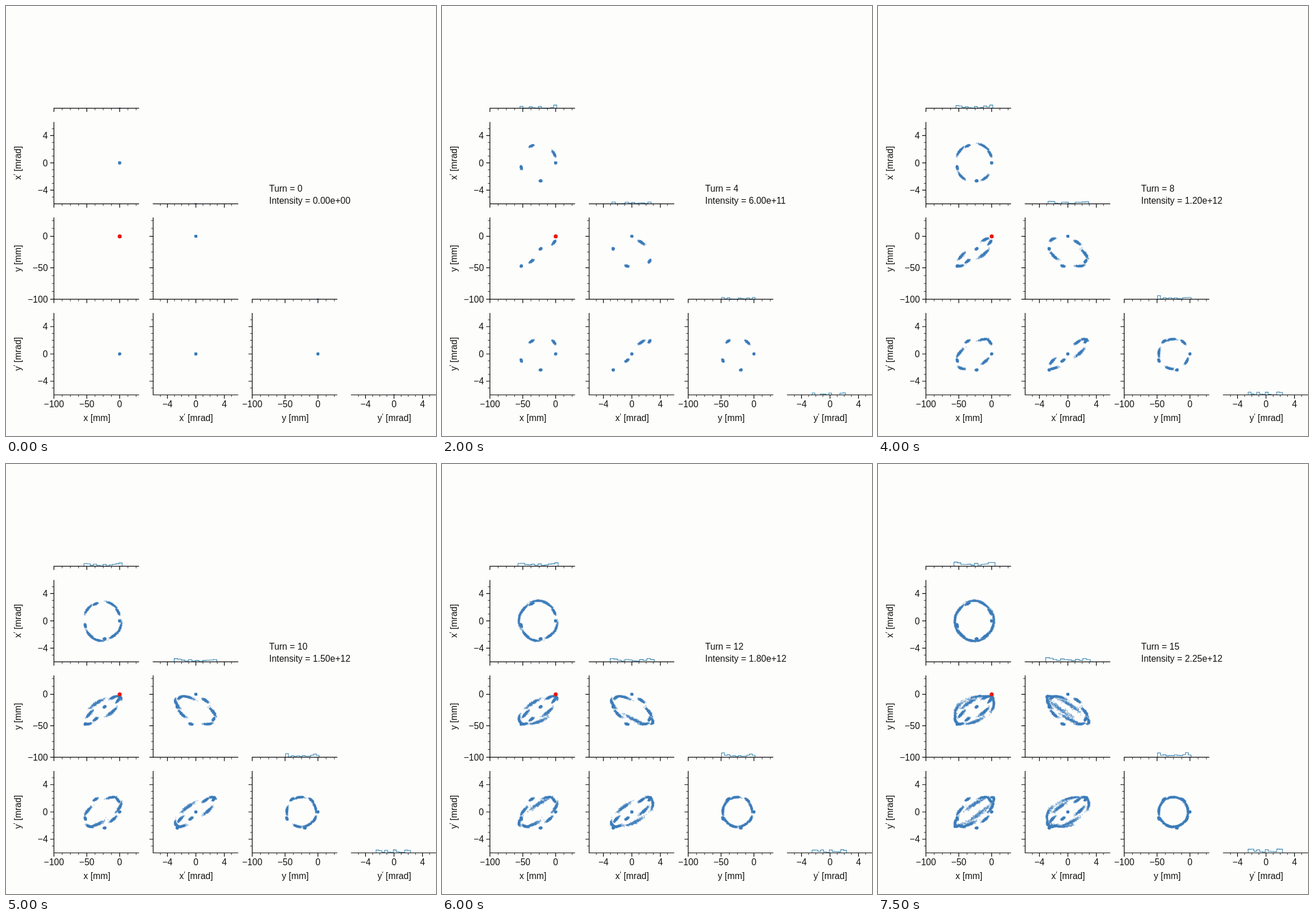
These frames come from a looping animation (748 px wide and 748 px high, 8000 ms). An HTML page with a canvas:

```html
<!DOCTYPE html>
<html lang="en">
<head>
<meta charset="utf-8">
<title>Phase space painting</title>
<style>
  html, body { margin: 0; width: 100%; height: 100%; overflow: hidden; background: #fdfdfc; }
  canvas, svg { position: absolute; left: 0; top: 0; width: 748px; height: 748px; }
  text { font: 15.6px "Liberation Sans", Arial, sans-serif; fill: #111; }
  .prime { font-size: 12px; }
  .axes { stroke: #000; stroke-width: 1.2; fill: none; }
  .minor { stroke: #000; stroke-width: .8; fill: none; }
</style>
</head>
<body>
<canvas id="beam" width="748" height="748"></canvas>
<svg id="plot" viewBox="0 0 748 748">
  <path class="axes" id="axes"/>
  <path class="minor" id="minor"/>
  <circle cx="197.8" cy="400.8" r="3.5" fill="#e8170f"/>
  <text id="turn" x="457.8" y="323"></text>
  <text id="intensity" x="457.8" y="344.2"></text>
</svg>
<script>
const TURN_MS = 500, TURNS = 16, PER_BUNCH = 300, BINS = 12;
const BUNCH_HEIGHT = 3.2;
const WIDTH = 148.6, HEIGHT = 142.5;
const LEFT = [83.4, 256, 428.3, 600.7];
const BOTTOM = [177.8, 344.2, 510.2, 676.5];

const mm = { min: -100, max: 30, major: [-100, -50, 0], step: 12.5, noise: 1.4 };
const mrad = { min: -6, max: 6, major: [-4, 0, 4], step: 1, noise: 0.13 };
const DIMS = [
  { name: "x", unit: "mm", ...mm },
  { name: "x′", unit: "mrad", ...mrad },
  { name: "y", unit: "mm", ...mm },
  { name: "y′", unit: "mrad", ...mrad }
];

const $ = id => document.getElementById(id);
const ctx = $("beam").getContext("2d");
const frac = (dim, v) => (v - dim.min) / (dim.max - dim.min);
const px = (d, v, col = d) => LEFT[col] + frac(DIMS[d], v) * WIDTH;
const py = (d, v) => BOTTOM[d] - frac(DIMS[d], v) * HEIGHT;

let seed = 7;
function random() {
  seed = (Math.imul(seed, 1664525) + 1013904223) >>> 0;
  return seed / 4294967296;
}
// Bounded bell curve within ±1.5
const bell = () => random() + random() + random() - 1.5;

// Particles of a bunch that has circulated for k turns
function makeBunch(k) {
  const rx = Math.min(26.3 + 0.3 * k, 29.8);
  const ry = Math.max(25.1 - 0.4 * k, 22.3);
  return Array.from({ length: PER_BUNCH }, () => {
    const drift = bell() * 0.04;
    const ax = k * (drift + bell() * 0.008 - 82.6 * Math.PI / 180);
    const ay = k * (drift + bell() * 0.008 - 77.8 * Math.PI / 180);
    const center = [
      -26.3 + rx * Math.cos(ax), 0.0995 * rx * Math.sin(ax),
      -25.1 + ry * Math.cos(ay), 0.097 * ry * Math.sin(ay)
    ];
    return center.map((v, d) => v + bell() * DIMS[d].noise);
  });
}
const bunches = Array.from({ length: TURNS }, (_, k) => makeBunch(k));

function drawScatter(points) {
  const size = 1.8;
  ctx.fillStyle = "rgba(65, 127, 187, .35)";
  for (let row = 1; row < 4; row++) {
    for (let col = 0; col < row; col++) {
      for (const p of points) {
        ctx.fillRect(px(col, p[col]) - size / 2, py(row, p[row]) - size / 2, size, size);
      }
    }
  }
}

function drawHistogram(points, d) {
  const values = points.map(p => p[d]);
  const lo = Math.min(...values), hi = Math.max(...values);
  const width = (hi - lo) / BINS;
  const counts = new Array(BINS).fill(0);
  for (const v of values) counts[Math.min(BINS - 1, Math.floor((v - lo) / width))]++;

  ctx.strokeStyle = "#2f7fac";
  ctx.lineWidth = 1.1;
  ctx.beginPath();
  ctx.moveTo(px(d, lo), BOTTOM[d]);
  counts.forEach((n, i) => {
    const y = BOTTOM[d] - n / PER_BUNCH * BUNCH_HEIGHT;
    ctx.lineTo(px(d, lo + i * width), y);
    ctx.lineTo(px(d, lo + (i + 1) * width), y);
  });
  ctx.lineTo(px(d, hi), BOTTOM[d]);
  ctx.stroke();
}

function addText(content, x, y, anchor, rotated) {
  const el = document.createElementNS("http://www.w3.org/2000/svg", "text");
  el.setAttribute("text-anchor", anchor);
  el.setAttribute("transform", `translate(${x} ${y})${rotated ? " rotate(-90)" : ""}`);
  el.innerHTML = content;
  $("plot").append(el);
}

const tickText = v => String(v).replace("-", "−");
function axisLabel({ name, unit }) {
  const prime = '<tspan class="prime" dy="-4">′</tspan><tspan dy="4"> </tspan>';
  return (name.length > 1 ? name[0] + prime : name + " ") + `[${unit}]`;
}

function buildAxes() {
  let axes = "", minor = "";
  for (let row = 0; row < 4; row++) {
    for (let col = 0; col <= row; col++) {
      const dx = DIMS[col], dy = DIMS[row], x0 = LEFT[col], y0 = BOTTOM[row];
      axes += `M${x0 - .6} ${y0}h${WIDTH}`;
      for (let v = dx.major[0] - 4 * dx.step; v < dx.max; v += dx.step) {
        if (v < dx.min || v === dx.min && dx.unit === "mrad") continue;
        const x = px(col, v);
        if (dx.major.includes(v)) axes += `M${x} ${y0}v6.5`;
        else minor += `M${x} ${y0}v3.6`;
      }
      if (col === row) continue;
      axes += `M${x0} ${y0}V${y0 - HEIGHT}`;
      for (let v = dy.major[0] - 4 * dy.step; v < dy.max; v += dy.step) {
        if (v < dy.min || v === dy.min && dy.unit === "mrad") continue;
        const y = py(row, v);
        if (dy.major.includes(v)) axes += `M${x0} ${y}h-6.5`;
        else minor += `M${x0} ${y}h-3.6`;
      }
    }
  }
  $("axes").setAttribute("d", axes);
  $("minor").setAttribute("d", minor);

  DIMS.forEach((dim, d) => {
    for (const v of dim.major) {
      addText(tickText(v), px(d, v), 698, "middle");
      if (d) addText(tickText(v), 72.8, py(d, v) + 5.6, "end");
    }
    addText(axisLabel(dim), LEFT[d] + WIDTH / 2 + .5, 722.3, "middle");
    if (d) addText(axisLabel(dim), 25.6, BOTTOM[d] - HEIGHT / 2, "middle", true);
  });
}

function drawTurn(turn) {
  const points = bunches.slice(0, turn + 1).flat();
  ctx.clearRect(0, 0, 748, 748);
  drawScatter(points);
  for (let d = 0; d < 4; d++) drawHistogram(points, d);
  $("turn").textContent = `Turn = ${turn}`;
  $("intensity").textContent =
    `Intensity = ${turn ? (turn * 1.5e11).toExponential(2) : "0.00e+00"}`;
}

let shown = -1;
function tick() {
  const turn = Math.floor(performance.now() / TURN_MS) % TURNS;
  if (turn !== shown) drawTurn(shown = turn);
  requestAnimationFrame(tick);
}
buildAxes();
tick();
</script>
</body>
</html>
```
